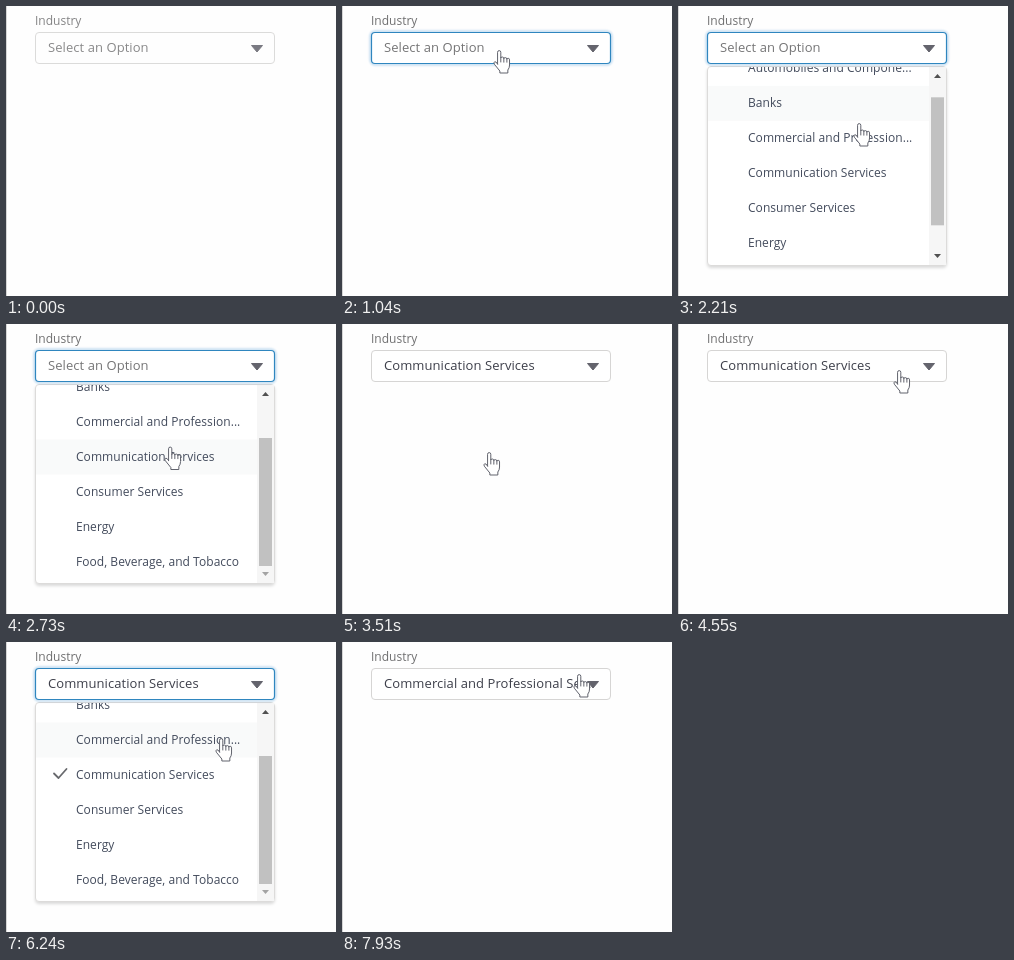
Recreate the animation shown at these times as an HTML page. Size 330 px wide and 290 px high, loop 8 s.

```html
<!DOCTYPE html>
<html lang="en">
<head>
<meta charset="utf-8">
<title>Industry picklist</title>
<style>
  html, body { margin: 0; width: 100%; height: 100%; overflow: hidden; background: #fefefe; }
  svg { display: block; width: 100%; height: 100%; }
  text { font-family: "Open Sans", "Noto Sans", sans-serif; font-size: 12px; fill: #434b5c; white-space: pre; }
  #list text { letter-spacing: .04px; }
  #label { fill: #6f6f70; }
  #value { font-size: 13px; letter-spacing: .07px; }
  #box { fill: #fff; stroke: #d6d5d4; }
  .focus #box { stroke: #2f86bf; stroke-width: 1.2; }
  #glow { fill: none; stroke: #1478c8; stroke-width: 1.5; filter: blur(1px); opacity: 0; }
  .focus #glow { opacity: .4; }
  #panel { fill: #fff; stroke: #dcdbda; filter: drop-shadow(0 2px 1.5px rgba(0, 0, 0, .14)); }
  #hand { fill: #fff; stroke: #5d5f69; stroke-linejoin: round; stroke-linecap: round; }
</style>
</head>
<body>
<svg viewBox="0 0 330 290">
  <defs>
    <clipPath id="view"><rect x="30" y="61" width="238" height="198"/></clipPath>
  </defs>
  <rect width="330" height="290" fill="#fefefe"/>
  <rect width="1" height="290" fill="#d6d6d6"/>

  <g id="menu">
    <rect id="panel" x="29.5" y="60.5" width="239" height="199" rx="3.5"/>
    <g clip-path="url(#view)">
      <g id="list">
        <rect id="hover" x="30" width="221" height="35" fill="#f9fafa"/>
        <path id="check" fill="none" stroke="#68696d" stroke-width="1.8" stroke-linecap="round" stroke-linejoin="round"/>
      </g>
      <rect x="251" y="61" width="17" height="198" fill="#f6f6f6"/>
      <rect id="thumb" x="253" width="13" height="128" fill="#c1c1c1"/>
      <path id="up" d="M256 72l3.5-4 3.5 4z"/>
      <path id="down" d="M256 248l3.5 4 3.5-4z"/>
    </g>
  </g>

  <g id="field">
    <text id="label" x="29" y="19">Industry</text>
    <rect id="glow" x="28.5" y="25.5" width="241" height="33" rx="4.5"/>
    <rect id="box" x="29.5" y="26.5" width="239" height="31" rx="3.5"/>
    <text id="value" x="42" y="46"></text>
    <path d="M245.5 39.5h11l-5.5 6.5z" fill="#64646d" stroke="#64646d" stroke-linejoin="round"/>
  </g>

  <g id="hand">
    <g transform="translate(-.8 0) scale(.95 1)">
      <path d="M4.6 14V2.3a1.7 1.7 0 0 1 3.4 0V8q0-1 1.6-1t1.6 1.6q0-1 1.6-1t1.6 1.6q0-.9 1.4-.9t1.4 1.6V15q0 3-1.8 5V23H7v-2L1.2 14.2q-1-1.6.3-2.4t3.1 2.2z"/>
      <path d="M8 8v4M11.2 8.6v3.6M14.4 9.2v3" fill="none"/>
    </g>
  </g>
</svg>
<script>
const LOOP = 8000, STEP = 130, ROW = 35, TOP = 63.5, MAX = 53;
const $ = id => document.getElementById(id);

const options = [
  "Automobiles and Compone...", "Banks", "Commercial and Profession...",
  "Communication Services", "Consumer Services", "Energy", "Food, Beverage, and Tobacco"
];
const PROMPT = "Select an Option";

// moments of the two visits to the field
const first = { focus: 1040, open: 1170, pick: 3380, blur: 3510 };
const second = { focus: 4680, open: 4810, pick: 7150, blur: 7280 };

const entry = { x: 173, y: 218 };
const moves = [
  { from: 130, to: 910, x: 152, y: 44 },
  { from: 1300, to: 1820, x: 176, y: 117 },
  { from: 2600, to: 2860, x: 142, y: 128 },
  { from: 3640, to: 4550, x: 216, y: 46 },
  { from: 5590, to: 5980, x: 210, y: 96 },
  { from: 7540, to: 7930, x: 232, y: 32 }
];

function ease(t, from, to) {
  const p = Math.min(1, Math.max(0, (t - from) / (to - from)));
  return p * p * (3 - 2 * p);
}

function pointer(t) {
  let { x, y } = entry;
  for (const m of moves) {
    const p = ease(t, m.from, m.to);
    x += (m.x - x) * p;
    y += (m.y - y) * p;
  }
  return { x, y };
}

const during = (t, start, end) => [first, second].some(v => t >= v[start] && t < v[end]);
const rowTop = i => TOP + ROW * i;
const show = (id, on) => $(id).setAttribute("visibility", on ? "inherit" : "hidden");
const arrowFill = active => active ? "#505050" : "#a3a3a3";

options.forEach((name, i) => {
  const el = document.createElementNS("http://www.w3.org/2000/svg", "text");
  el.setAttribute("x", 70);
  el.setAttribute("y", rowTop(i) + 21.5);
  el.textContent = name;
  $("list").append(el);
});
$("check").setAttribute("d", `M48 ${rowTop(3) + 16}l4.5 4.5 8-9`);

function draw(t) {
  const { x, y } = pointer(t);
  const scroll = MAX * ease(t, 1950, 2600);

  show("hand", t >= moves[0].from);
  $("hand").setAttribute("transform", `translate(${x} ${y})`);

  const value = t < first.pick ? PROMPT : t < second.pick ? options[3] : "Commercial and Professional Se...";
  $("value").textContent = value;
  $("value").style.fill = value === PROMPT ? "#757576" : "#3d3f4a";
  $("field").setAttribute("class", during(t, "focus", "blur") ? "focus" : "");
  $("field").setAttribute("opacity", .85 + .15 * ease(t, 0, 520));

  show("menu", during(t, "open", "pick"));
  $("list").setAttribute("transform", `translate(0 ${-scroll})`);
  $("thumb").setAttribute("y", 79 + scroll * 35 / MAX);
  $("up").setAttribute("fill", arrowFill(scroll > 0));
  $("down").setAttribute("fill", arrowFill(scroll < MAX));
  show("check", t >= first.pick);

  // the highlight stays on its row until scrolling ends
  const tip = y + 1, row = Math.floor((tip + (scroll < MAX ? 0 : scroll) - TOP) / ROW);
  show("hover", tip > 61 && row >= 0);
  $("hover").setAttribute("y", rowTop(row));
}

const start = performance.now();
function tick() {
  const t = (performance.now() - start) % LOOP;
  draw(Math.floor(t / STEP) * STEP);
  requestAnimationFrame(tick);
}
tick();
</script>
</body>
</html>
```
